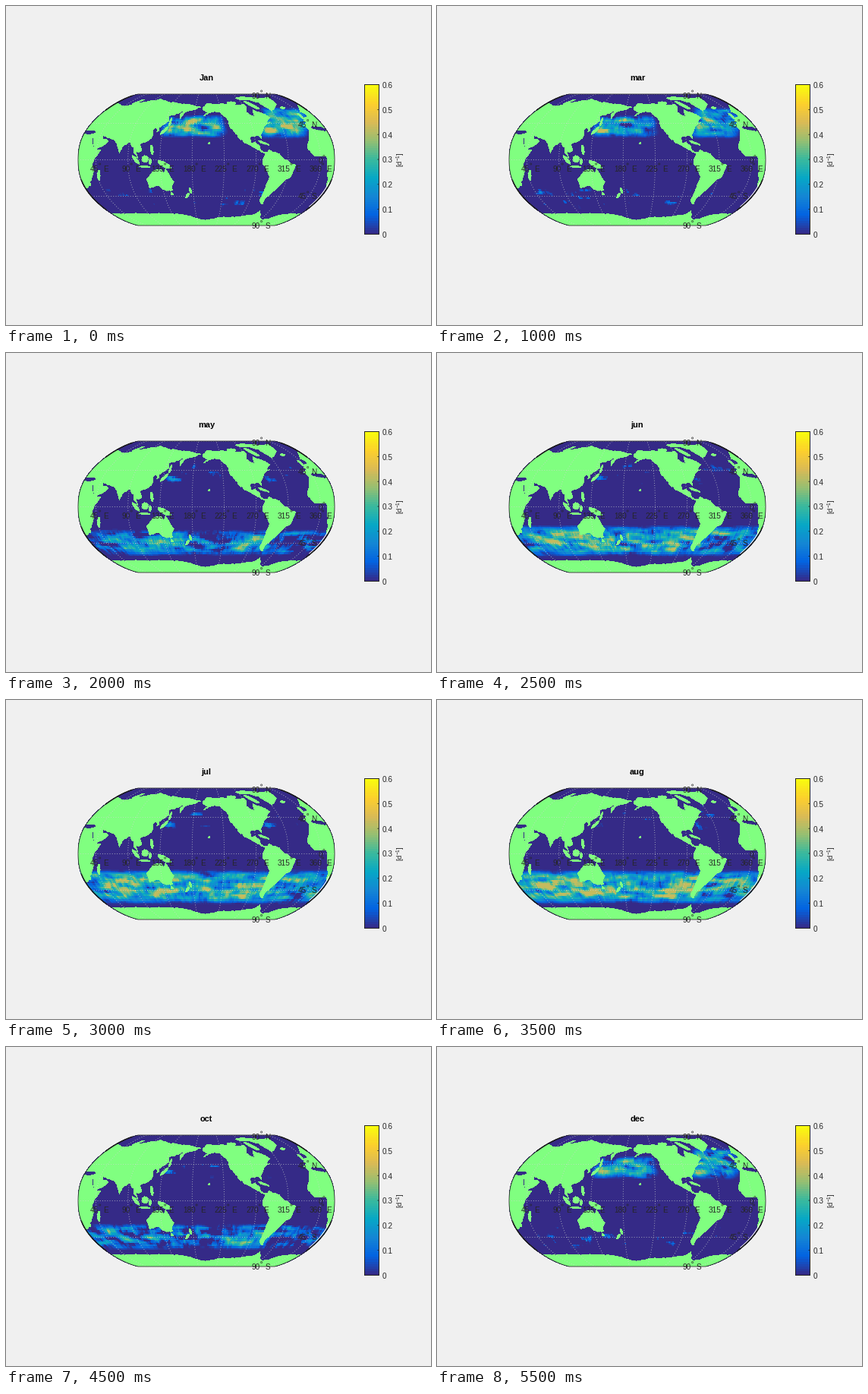
Write a matplotlib script that moves like this. It is 560 px wide and 420 px high and loops after 6000 ms.

```python
import numpy as np
import matplotlib.pyplot as plt
from matplotlib.animation import FuncAnimation
from matplotlib.colors import LinearSegmentedColormap
from matplotlib.patches import Circle, Polygon, Rectangle

W, H, PT = 560, 420, 0.72
INK, LAND, OCEAN = "#262626", "#80ff80", "#352a87"
MONTHS = "Jan feb mar apr may jun jul aug sep oct nov dec".split()

plt.rcParams.update({"font.family": "Liberation Sans", "mathtext.fontset": "custom",
                     "mathtext.rm": "Liberation Sans", "path.snap": False})

PARULA = LinearSegmentedColormap.from_list("parula", [
    OCEAN, "#0363e1", "#1485d4", "#06a7c6", "#38b99e", "#92bf73", "#d9ba56", "#fcce2e",
    "#f9fb0e"], N=64)

# Robinson projection as quartics through five key latitudes
KEY_LATS = (0, 30, 60, 75, 90)
WIDTH = np.polyfit(KEY_LATS, (1, .96, .7986, .6732, .5322), 4)
HEIGHT = np.polyfit(KEY_LATS, (0, .372, .7346, .8936, 1), 4)


def project(lon, lat):
    a = np.abs(lat)
    x = 264 + 169 * np.polyval(WIDTH, a) * (np.asarray(lon) - 200) / 180
    return x, 202.5 - 86.5 * np.sign(lat) * np.polyval(HEIGHT, a)


def bump(x, centre, width, power=2):
    return np.exp(-np.abs((x - centre) / width) ** power)


fig = plt.figure(figsize=(W / 100, H / 100), dpi=100, facecolor="#f0f0f0")
ax = fig.add_axes([0, 0, 1, 1])
ax.axis("off")

lats = np.linspace(-90, 90, 181)
rim = np.hstack([project(20, lats), project(380, lats[::-1])]).T
frame = Polygon(rim, fc="none", ec=INK, lw=.8 * PT, zorder=6)
ax.add_patch(frame)

rng = np.random.default_rng(4)


def land(*points, color=LAND, rough=.07):
    """Fill a lon/lat polygon whose coast is roughened by midpoint displacement."""
    p = np.array(points, float)
    for _ in range(3):
        d = np.roll(p, -1, axis=0) - p
        size = np.hypot(*d.T)
        kick = rough * rng.normal(size=len(p)) * np.minimum(1, 10 / size)
        mid = p + d / 2 + kick[:, None] * np.column_stack([-d[:, 1], d[:, 0]])
        p = np.stack([p, mid], axis=1).reshape(-1, 2)
    p[:, 1] = np.clip(p[:, 1], -90, 90)
    patch = Polygon(np.column_stack(project(*p.T)), fc=color, lw=0, antialiased=False, zorder=2)
    ax.add_patch(patch)
    patch.set_clip_path(frame)


def island(lon, lat, rx, ry, tilt=0, color=LAND):
    t = np.linspace(0, 2 * np.pi, 10, endpoint=False)
    a = np.radians(tilt)
    u, v = rx * np.cos(t), ry * np.sin(t)
    land(*zip(lon + u * np.cos(a) - v * np.sin(a), lat + u * np.sin(a) + v * np.cos(a)),
         color=color)


# Africa, Arabia, southern Asia, northern Eurasia
land((16, -35), (20, -35), (29, -32), (35, -24), (40, -15), (39, -5), (51, 12), (43, 11.5),
     (37, 20), (32.5, 30), (36, 38), (16, 38))
land((35, 29), (43.5, 12.7), (52, 16), (59.5, 22.5), (56, 25), (51, 24.5), (48, 30),
     (52, 40), (32, 40), (33, 31))
land((40, 36), (48, 30), (57, 27), (67, 25), (72.7, 20), (77.5, 8), (80, 15), (91, 22.5),
     (94.5, 16), (98, 15), (98.5, 8), (103.5, 1.3), (100, 13), (105, 8.7), (109, 12),
     (106, 20), (113, 22), (113, 46), (40, 46))
land((16, 36), (110, 36), (111, 21.5), (120, 26), (122, 31), (119, 37), (125, 39.5),
     (126.5, 34.5), (129, 36), (128, 39.5), (140, 48), (136, 55), (155, 59.5), (163, 62),
     (156, 56), (157, 51), (163, 59), (179, 62.5), (190, 66), (160, 70), (128, 72.5),
     (104, 77.5), (70, 72), (44, 67), (25, 71), (16, 70))
# The Americas and Greenland
land((193, 65), (203, 71), (225, 69.5), (265, 68), (272, 70), (275, 66), (265, 59),
     (280, 52), (283, 62), (292, 59), (304, 52), (292, 47), (300, 46), (290, 42), (284, 36),
     (279, 31), (280, 26), (276, 30), (263, 28), (263, 20), (270, 21), (276, 15), (277, 9),
     (283, 8), (270, 13.5), (255, 20), (246, 31), (250, 24), (243, 32.5), (236, 42),
     (236, 48), (224, 59.5), (207, 59), (196, 54.5), (203, 59), (195, 62))
land((283, 8), (289, 12), (302, 7), (310, 0), (325, -6), (320, -20), (312, -26), (302, -38),
     (293, -50), (294, -55), (286, -50), (290, -20), (279, -4), (282, 4))
land((288, 78), (306, 73), (316, 60), (337, 70), (341, 81), (300, 82))
# Western Africa with Europe, Australia
land((384, -35), (378, -33), (372, -18), (369, 4), (352, 4.5), (343, 14), (350, 30),
     (354, 36), (351, 43), (358, 46), (356, 48.5), (370, 55), (365, 60), (375, 68), (384, 71))
land((114, -23), (116, -34.5), (130, -31.6), (140, -38), (149, -37.5), (153, -27),
     (145, -15), (142.5, -11), (140, -17), (136, -12), (130, -12))

# Antarctica: a wavering coast with two bays and a peninsula
lon = np.arange(16, 386, 6)
coast = (-68 - 9.5 * bump(lon, 195, 28) - 5 * bump(lon, 250, 35)
         - 9 * bump(lon, 322, 18) + 7 * bump(lon, 299, 5))
land(*zip(lon, coast), (384, -90), (16, -90))

# Eastern Asia and the Pacific
island(137, 36, 7, 1.6, 45)
island(143, 47, 1.2, 5)
island(123, 12, 1.8, 6, 15)
island(114, 1, 4.5, 4)
island(101, 0, 7, 1.7, -45)
island(113, -8, 8, .8, -5)
island(121, -2, 1.5, 3.5)
island(141, -5.5, 10, 2.7, -25)
island(147, -42, 1.7, 1.5)
island(176, -38, 1.5, 3.5, 20)
island(170.5, -44, 4.5, 1.3, 45)
island(47, -19, 1.8, 6.5, -15)
island(204, 20, 1.2, .9)
# Atlantic and Arctic
island(282, 20.5, 8, 1, -20)
island(287, 69, 11, 2.6, -30)
island(280, 80, 14, 2.3)
island(250, 72, 9, 2)
island(341, 65, 4, 1.2)
island(357.5, 54, 1.8, 4, 15)
island(60, 74, 7, 1.2, 30)
# Mediterranean, on both margins of the map
island(27, 34, 8, 2, color=OCEAN)
island(371, 38.5, 11, 2, -8, color=OCEAN)

# Seasonal blooms on a two-degree grid
LON, LAT = np.meshgrid(np.arange(20, 381, 2), np.arange(-90, 91, 2))
CLON, CLAT = LON[:-1, :-1] + 1, LAT[:-1, :-1] + 1


def streaks(seed):
    """Noise drawn out along the parallels, centred on 0.5."""
    n = np.random.default_rng(seed).normal(size=CLON.shape)
    n = sum(np.roll(n, k, axis=1) for k in range(-4, 5))
    n = n + .7 * (np.roll(n, 1, axis=0) + np.roll(n, -1, axis=0))
    return .5 + .23 * n / n.std()


COMMON = streaks(1)


def season(month, peak):
    return max(0, np.cos(2 * np.pi * (month - peak) / 12))


def bloom(month):
    grain = .65 * (COMMON - .5) + .75 * (streaks(10 + month) - .5) + .5
    south, north = season(month, 6.5), season(month, .5)

    def level(area, strength, extra=0):
        return area * (grain + extra - .85 + .97 * strength ** .35)

    belt = bump(CLAT, -45 + 5 * south, 12 + 6 * south, 6)
    pacific = bump(CLON, 181, 44, 8) * bump(CLAT, 42, 12, 6)
    atlantic = bump(CLON - .8 * (CLAT - 45), 322, 34, 6) * bump(CLAT, 47, 17, 6)
    west = .35 * (bump(CLON, 148, 18) + bump(CLON, 295, 14)) * bump(CLAT, 34, 7)
    swell = .12 * np.cos(np.radians(2 * (CLON - 90)))
    levels = (level(belt, south, swell), level(pacific, north, west - .08),
              level(atlantic, north, west))
    return .43 * np.clip(np.maximum.reduce(levels), 0, 1)


fields = [bloom(m) for m in range(12)]
mesh = ax.pcolormesh(*project(LON, LAT), fields[0], cmap=PARULA, vmin=0, vmax=.6,
                     antialiased=False, zorder=1)

# Graticule and rim
dots = dict(color="#cfd8d0", lw=.8 * PT, ls=(0, (1, 3)), zorder=4)
for meridian in range(45, 361, 45):
    ax.plot(*project(meridian, lats), **dots)
for parallel in range(-90, 91, 45):
    ax.plot(*project(np.array([20, 380]), np.full(2, parallel)), **dots)
for edge in (20, 380):
    for span in ((-62, -25), (62, 85)):
        ax.plot(*project(edge, np.linspace(*span, 40)), color="#1a1a1a", lw=1.5 * PT, zorder=6)
ax.plot(*project(377.8, np.linspace(-58, -28, 40)), color="white", lw=1.1 * PT, zorder=5)


def text(x, y, s, px=10, **kw):
    kw = {"color": INK, "va": "center_baseline", "zorder": 7, **kw}
    return ax.text(x, y, s, fontsize=px * PT, **kw)


def degrees(x, y, number, letter):
    half = 6.4 + 2.8 * len(number)
    text(x - half, y, number)
    text(x + half, y, letter, ha="right")
    ax.add_patch(Circle((x - half + 5.56 * len(number) + 1.5, y - 5.5), 1.1, fc="none",
                        ec=INK, lw=.6 * PT, zorder=7))


for i in range(8):
    degrees(123 + 41.6 * i, 213.5, str(45 * (i + 1)), "E")
for x, y, number, letter in ((336, 117.5, "90", "N"), (397, 156, "45", "N"), (421, 203, "0", ""),
                             (397, 250.5, "45", "S"), (336, 289, "90", "S")):
    degrees(x, y, number, letter)

# Colour bar
LEFT, RIGHT, TOP, BOTTOM = 472.5, 491.5, 103.5, 300.5
ax.pcolormesh([LEFT, RIGHT], np.linspace(BOTTOM, TOP, 65), np.arange(64)[:, None],
              cmap=PARULA, zorder=1)
ax.add_patch(Rectangle((LEFT, TOP), RIGHT - LEFT, BOTTOM - TOP, fc="none", ec=INK,
                       lw=PT, zorder=3))
for i in range(7):
    y = BOTTOM + (TOP - BOTTOM) * i / 6
    ax.plot([RIGHT - 2, RIGHT], [y, y], color=INK, lw=.7 * PT, zorder=3)
    text(496, y + .5, f"{i / 10:g}")
text(520, 202, r"$\mathrm{[d^{-1}]}$", 9.5, rotation=90, ha="center", va="center")

title = text(264, 98, MONTHS[0], 11, color="black", weight="bold", ha="center", va="baseline")
ax.set(xlim=(0, W), ylim=(H, 0))


def update(month):
    mesh.set_array(fields[month])
    title.set_text(MONTHS[month])
    return mesh, title


anim = FuncAnimation(fig, update, frames=12, interval=500, repeat=True, repeat_delay=0)
plt.show()
```
